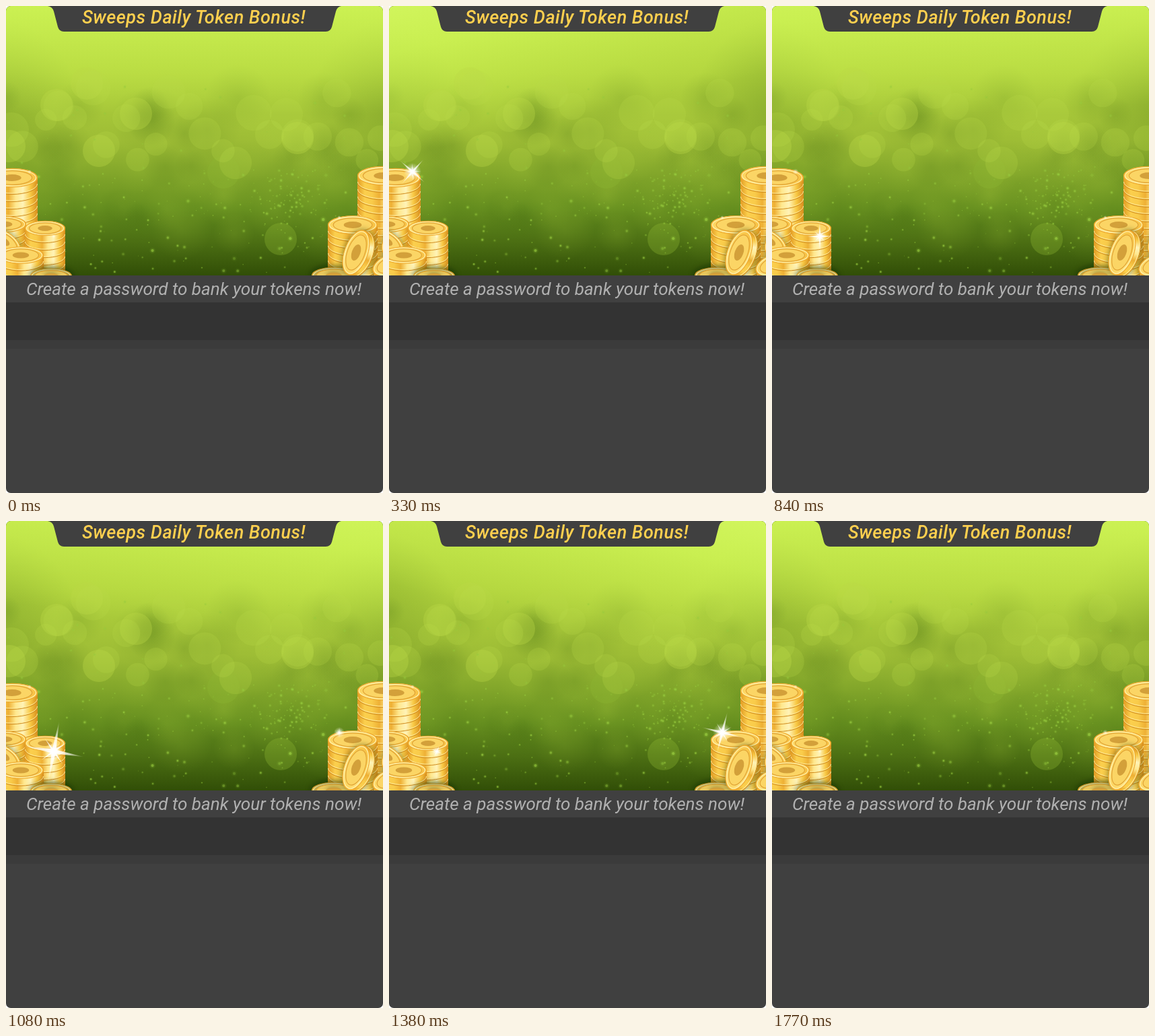
An HTML page with a canvas that plays this animation: 560 by 723 pixels, repeating every 1800 ms.

```html
<!DOCTYPE html>
<html lang="en">
<head>
<meta charset="utf-8">
<title>Daily Token Bonus</title>
<style>
html, body { margin: 0; width: 100%; height: 100%; overflow: hidden; background: #fff; }
#card { position: relative; width: 560px; height: 723px; overflow: hidden; border-radius: 7px; background: #404040; }
canvas, svg, p, i { position: absolute; left: 0; top: 0; margin: 0; }
p { width: 560px; text-align: center; white-space: nowrap; font-family: Roboto, sans-serif; font-style: italic; }
#title { left: -1px; line-height: 34px; font-size: 27px; font-weight: 500; letter-spacing: .5px; color: #ffd04f; }
#hint { top: 400px; left: -1px; line-height: 40px; font-size: 26.1px; color: #b1b1b1; }
#bar { top: 440px; width: 560px; height: 56px; background: #333; }
#lip { top: 496px; width: 560px; height: 13px; background: #3b3b3b; }
</style>
</head>
<body>
<div id="card">
  <canvas id="scene" width="560" height="400"></canvas>
  <svg width="560" height="40"><path fill="#404040" d="M62 0Q69 1 71 8L77 31Q79 38 86 38H475Q482 38 484 31L490 8Q492 1 498 0Z"/></svg>
  <p id="title">Sweeps Daily Token Bonus!</p>
  <p id="hint">Create a password to bank your tokens now!</p>
  <i id="bar"></i><i id="lip"></i>
</div>
<script>
const W = 560, H = 400, LOOP = 1800, STEP = 30, TAU = Math.PI * 2;
const ctx = document.getElementById('scene').getContext('2d');

let seed = 11;
const rand = () => (seed = (seed * 16807) % 2147483647) / 2147483647;
const span = (a, b) => a + rand() * (b - a);
const near = (mid, spread) => mid + (rand() + rand() - 1) * spread;
const times = (n, fn) => { for (let i = 0; i < n; i++) fn(i); };

function layer(draw) {
  const c = document.createElement('canvas');
  c.width = W; c.height = H;
  draw(c.getContext('2d'));
  return c;
}

// Spreads the colours evenly along the gradient.
function fade(g, ...colors) {
  colors.forEach((color, i) => g.addColorStop(i / (colors.length - 1), color));
  return g;
}

function disc(c, x, y, r, fill) {
  c.fillStyle = fill;
  c.beginPath();
  c.arc(x, y, r, 0, TAU);
  c.fill();
}

function glow(c, x, y, r, rgb, a) {
  disc(c, x, y, r, fade(c.createRadialGradient(x, y, 0, x, y, r), `rgba(${rgb},${a})`, `rgba(${rgb},0)`));
}

const ground = layer(c => {
  c.fillStyle = fade(c.createLinearGradient(0, 0, 0, H), '#b9de44', '#b2d43e', '#9dbc35', '#668f1f', '#314e07');
  c.fillRect(0, 0, W, H);
  for (const x of [-30, W + 30]) glow(c, x, 155, 140, '70,110,15', .3);
  times(60, () => {
    glow(c, span(0, W), span(130, 340), span(22, 50), rand() < .5 ? '165,198,58' : '66,106,16', .15);
  });
});

const BOKEH = [[5, 208], [75, 147], [120, 115], [138, 215], [193, 160], [323, 247], [408, 346], [433, 196]];

const motes = layer(c => {
  const bubble = (x, y, r, a) => disc(c, x, y, r, `rgba(${y > 240 ? '142,182,50' : '188,216,72'},${a})`);
  BOKEH.forEach(([x, y]) => bubble(x, y, 24, .34));
  times(24, i => bubble(i * 24 + span(0, 12), near(185, 75), span(16, 27), .22));

  const dot = (x, y, r, a) => {
    glow(c, x, y, r * 1.8, '150,205,60', a * .6);
    disc(c, x, y, r * .75, `rgba(150,200,62,${a})`);
  };
  times(150, () => dot(span(45, 510), span(238, 398), .6 + 2.4 * rand() ** 2, span(.25, .7)));
  times(80, () => dot(near(425, 80), near(285, 48), span(.7, 2.2), span(.3, .65)));
  times(25, () => dot(span(0, W), span(120, 240), span(.7, 2.2), .4));
});

function oval(c, rx, ry, fill, line) {
  c.beginPath();
  c.ellipse(0, 0, rx, ry, 0, 0, TAU);
  if (fill) { c.fillStyle = fill; c.fill(); }
  if (line) { c.strokeStyle = line; c.lineWidth = 1.3; c.stroke(); }
}

// An upright pile reaches the bottom of the scene; a turned one is a single coin.
function pile(c, x, y, rx, turn = 0) {
  const ry = rx * (turn ? .5 : .37), thick = turn ? 8 : 11;
  const count = turn ? 1 : Math.ceil((H - y) / thick);
  c.save();
  c.translate(x, y);
  c.rotate(turn * Math.PI / 180);
  const side = fade(c.createLinearGradient(-rx, 0, rx, 0),
    '#e29a22', '#fbcf4d', '#f9cb4a', '#eeb035', '#ffe88e', '#fff3b8', '#f8c945', '#d78c1b');
  const face = fade(c.createLinearGradient(-rx, -ry, rx, ry), '#fbcb49', '#ffe789', '#fdd45a', '#f5b93c');
  c.shadowColor = 'rgba(22,50,0,.55)';
  c.shadowBlur = 10;
  for (let base = count * thick; base > 0; base -= thick) {
    c.beginPath();
    c.ellipse(0, base, rx, ry, 0, 0, Math.PI);
    c.ellipse(0, base - thick, rx, ry, 0, Math.PI, TAU);
    c.fillStyle = side;
    c.fill();
    c.shadowColor = 'transparent';
    ['#cf8a1c', '#ffec9c'].forEach((color, i) => {
      c.beginPath();
      c.ellipse(0, base - .5 - i * 1.5, rx - .5, ry, 0, 0, Math.PI);
      c.strokeStyle = color;
      c.lineWidth = 1;
      c.stroke();
    });
  }
  oval(c, rx - .5, ry - .5, face, '#eeaa30');
  oval(c, rx - 2.5, ry - 1.7, null, '#fff0a8');
  oval(c, rx * .78, ry * .74, '#fbd565', '#e2a536');
  oval(c, rx * .36, ry * .36, '#d3a03a');
  c.restore();
}

const coins = layer(c => {
  pile(c, 9, 255, 38);
  pile(c, -2, 324, 32);
  pile(c, 58, 330, 30);
  pile(c, -4, 349, 29, 32);
  pile(c, 22, 370, 34);
  pile(c, 67, 401, 31);
  pile(c, 560, 252, 38);
  pile(c, 515, 325, 37);
  pile(c, 575, 383, 32, -20);
  pile(c, 571, 349, 21, -65);
  pile(c, 487, 400, 33);
  pile(c, 520, 366, 35, -70);
});

function light(tilt) {
  ctx.save();
  ctx.translate(W / 2, 30);
  ctx.rotate(-tilt * .25);
  ctx.fillStyle = fade(ctx.createLinearGradient(0, -100, 0, 130),
    'rgba(212,248,96,.9)', 'rgba(208,246,86,.75)', 'rgba(204,240,80,.4)', 'rgba(200,235,75,0)');
  ctx.fillRect(-W, -300, W * 2, 430);
  ctx.restore();
}

const STARS = [
  { x: 35, y: 246, peak: 450, ray: 30, lean: 47 },
  { x: 71, y: 342, peak: 1075, ray: 46, lean: 10 },
  { x: 495, y: 314, peak: 1375, ray: 32, lean: 14 }
];

function star({ x, y, peak, ray, lean }, t) {
  const age = t - peak, k = Math.cos(Math.min(1, Math.abs(age) / 425) * Math.PI / 2);
  glow(ctx, x, y, 3 + 11 * k, '255,255,240', .6 + .3 * k);
  const size = ray * k ** 1.7;
  if (size < 1) return;
  ctx.save();
  ctx.translate(x, y);
  ctx.rotate((lean + age * .045) * Math.PI / 180);
  ctx.fillStyle = fade(ctx.createRadialGradient(0, 0, 0, 0, 0, size),
    '#fff', 'rgba(255,255,250,.7)', 'rgba(255,255,240,0)');
  for (const r of [size, size * .5]) {
    ctx.beginPath();
    times(8, i => {
      const a = i * TAU / 8, d = i % 2 ? r * .09 : r;
      ctx.lineTo(Math.cos(a) * d, Math.sin(a) * d);
    });
    ctx.fill();
    ctx.rotate(TAU / 8);
  }
  ctx.restore();
  glow(ctx, x, y, 3 + 5 * k, '255,255,255', k);
}

function paint(t) {
  ctx.drawImage(ground, 0, 0);
  light(Math.sin(TAU * t / LOOP));
  ctx.drawImage(motes, 0, 0);
  ctx.drawImage(coins, 0, 0);
  STARS.forEach(s => star(s, t));
}

const start = performance.now();
function tick() {
  const t = (performance.now() - start) % LOOP;
  paint(Math.floor(t / STEP) * STEP);
  requestAnimationFrame(tick);
}
tick();
</script>
</body>
</html>
```
